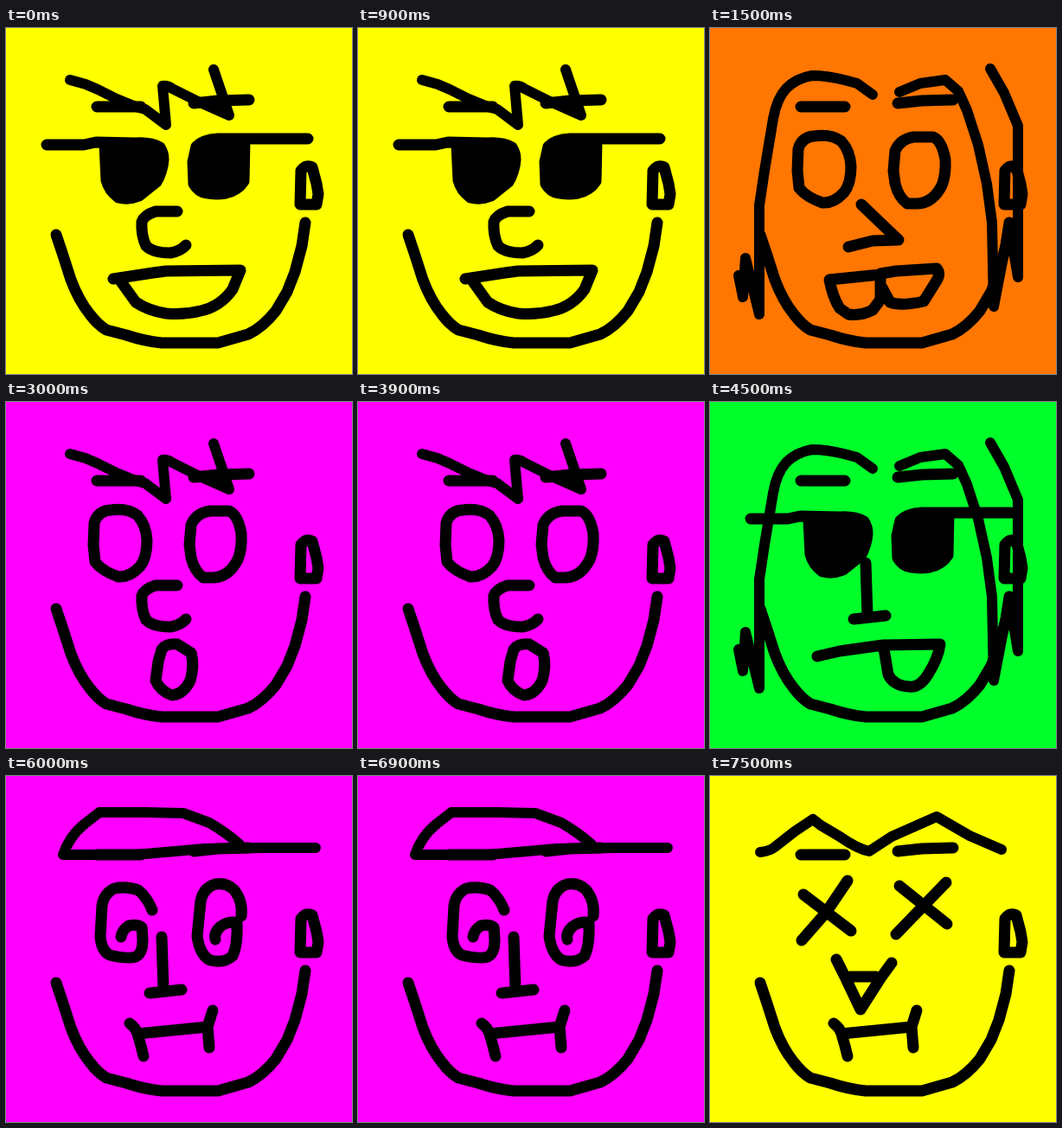
Animation of 400x400 px, one loop 8000 ms. Source, as an HTML page:

```html
<!DOCTYPE html>
<html lang="en">
<head>
<meta charset="utf-8">
<title>Shuffling faces</title>
<style>
  html, body { margin: 0; width: 100%; height: 100%; overflow: hidden; }
  svg { display: block; width: 100vw; height: 100vh; }
  path { fill: none; stroke: #000; stroke-width: 13; stroke-linecap: round; stroke-linejoin: round; }
  #hair { stroke-width: 12; }
</style>
</head>
<body>
<svg viewBox="0 0 400 400">
  <rect id="back" width="400" height="400"/>
  <path d="M58 239L66 263L75 291Q84 315 97 331Q106 343 116 349L139 355Q160 362 180 364H245L280 354Q297 346 312 327L325 305L334 282L342 252L346 225"/>
  <path d="M340 204L341 165Q347 157 354 161L359 180L361 192L359 204Z"/>
  <path d="M105 91H156M217 87L245 84L281 83"/>
  <path id="hair"/>
  <path id="eyes"/>
  <path id="nose"/>
  <path id="mouth"/>
</svg>
<script>
const STEP = 1500, LOOP = 8000;

const parts = {
  hair: {
    messy: 'M74 60L92 65L106 71L128 82L150 91L161 94L185 112L181 67Q186 66 192 70L222 85L258 101L240 48',
    long: 'M188 77L170 64L155 60Q135 55 118 55Q100 58 88 70Q77 82 73 105L63 165L57 205V331L41 266L38 311L33 286' +
      'M219 74L243 64L272 60L287 73L297 95L310 135L320 180L326 225L328 322L346 228L356 288V113L340 75L324 47',
    cap: 'M358 83H300L230 84L150 91H66Q73 70 90 56L108 42H160L205 43L235 54Q254 65 270 79',
    wavy: 'M58 88Q69 87 75 82L98 64L119 50L128 57L150 70Q170 84 184 87L210 70L262 47L300 69L337 85'
  },
  eyes: {
    shades: 'M47 135H90L104 132L150 133Q168 132 178 138Q182 144 182 152Q181 166 174 178L154 194Q142 199 130 196Q119 188 116 176L114 135' +
      'M349 128H245Q228 129 220 137L216 155L217 180Q222 189 232 191Q243 193 254 191Q268 188 275 177L276 130',
    round: 'M102 140Q106 126 120 125Q140 122 152 131Q162 142 163 160Q163 180 155 190Q143 203 130 202Q112 196 103 185L101 165Z' +
      'M212 165L214 142Q220 128 236 126H258Q268 130 272 152Q273 170 268 182Q258 202 240 203H228Q218 196 214 180Z',
    spiral: 'M169 155Q163 140 153 132Q140 127 125 130Q113 136 111 150L109 185Q110 202 120 207Q140 212 150 209Q158 205 158 190L157 175Q152 171 142 173Q134 178 133 186' +
      'M272 162Q274 145 264 132Q255 123 242 125Q228 129 225 145L221 185Q224 207 236 213Q252 217 262 208Q268 195 267 170Q258 167 248 174Q240 181 242 189',
    cross: 'M108 137L163 179M159 121L134 158L106 190M219 127L274 171M273 123L215 183'
  },
  nose: {
    curl: 'M198 212H173Q160 216 157 224Q156 240 162 252Q170 260 190 260Q202 258 208 251',
    hook: 'M175 204L200 228L218 245L188 246L160 253',
    post: 'M180 186L182 246M166 251L203 247',
    wedge: 'M146 212L156 232L174 270L197 234L210 216M162 232H192'
  },
  mouth: {
    grin: 'M124 290L170 283L185 281L271 280L262 302Q248 322 225 327Q205 332 185 330Q165 327 150 317L132 292',
    teeth: 'M138 291Q142 312 150 324L160 331Q175 333 188 326L197 314V285ZM197 284L215 281L262 278Q267 284 262 292L247 316Q220 322 208 317L199 300',
    oh: 'M180 286Q185 279 198 280L214 290Q218 305 213 322Q205 338 192 339Q178 334 173 322L176 300Z',
    tongue: 'M124 294L150 288L200 281L266 280Q264 296 252 315Q242 331 230 329Q212 328 206 315L201 285',
    flat: 'M143 286Q150 291 152 298L156 312L159 324M152 298L233 290M239 271L233 290L235 314'
  }
};

const faces = [
  ['#ffff00', 'messy', 'shades', 'curl', 'grin'],
  ['#ff7600', 'long', 'round', 'hook', 'teeth'],
  ['#ff00ff', 'messy', 'round', 'curl', 'oh'],
  ['#00ff2a', 'long', 'shades', 'post', 'tongue'],
  ['#ff00ff', 'cap', 'spiral', 'post', 'flat'],
  ['#ffff00', 'wavy', 'cross', 'wedge', 'flat']
];

const el = id => document.getElementById(id);
let shown = -1;

function draw(time) {
  const index = Math.floor((time % LOOP) / STEP);
  if (index === shown) return;
  shown = index;
  const [color, ...picks] = faces[index];
  el('back').style.fill = color;
  Object.keys(parts).forEach((key, i) => el(key).setAttribute('d', parts[key][picks[i]]));
  el('eyes').style.fill = picks[1] === 'shades' ? '#000' : 'none';
}

const start = performance.now();
function tick() {
  draw(performance.now() - start);
  requestAnimationFrame(tick);
}
tick();
</script>
</body>
</html>
```
